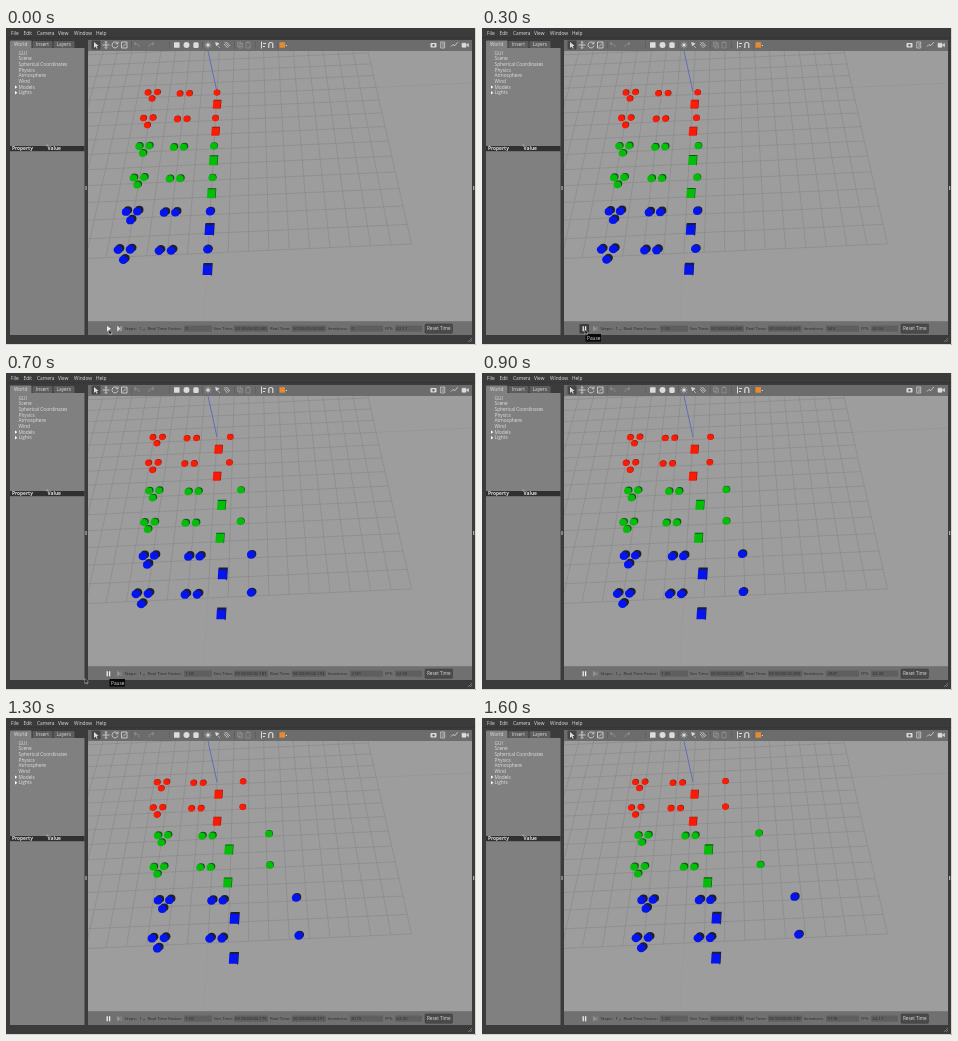
An HTML page for the animation above (1.7 s loop, 470x317 px).

```html
<!DOCTYPE html>
<html lang="en">
<head>
<meta charset="utf-8">
<title>Rolling shapes simulation</title>
<style>
html, body { margin: 0; width: 100%; height: 100%; overflow: hidden; background: #3b3b3b; }
svg { display: block; width: 470px; height: 317px; }
text { font-family: "Open Sans", "Noto Sans", sans-serif; font-size: 4.8px; fill: #dedede; }
.status { font-size: 4.3px; fill: #2a2a2a; }
</style>
</head>
<body>
<svg id="stage" viewBox="0 0 470 317" xmlns="http://www.w3.org/2000/svg">
  <defs><clipPath id="view"><rect x="82" y="23" width="384" height="270.5"/></clipPath></defs>
  <rect width="470" height="317" fill="#3b3b3b"/>
  <g id="frame"></g>
  <g id="scene" clip-path="url(#view)"></g>
  <g id="tools"></g>
  <g id="status"></g>
  <g id="overlay"></g>
</svg>
<script>
const $ = id => document.getElementById(id);
const frame = $("frame"), scene = $("scene"), tools = $("tools"), bar = $("status"), overlay = $("overlay");

function add(parent, tag, attrs, content) {
  const el = document.createElementNS("http://www.w3.org/2000/svg", tag);
  for (const key in attrs) el.setAttribute(key, attrs[key]);
  if (content !== undefined) el.textContent = content;
  parent.appendChild(el);
  return el;
}
const rect = (p, x, y, width, height, fill, more) => add(p, "rect", { x, y, width, height, fill, ...more });
const disc = (p, cx, cy, rx, ry, fill) => add(p, "ellipse", { cx, cy, rx, ry, fill });
const path = (p, d, stroke, width = 0.8, fill = "none") =>
  add(p, "path", { d, stroke, "stroke-width": width, fill });
const label = (p, x, y, str, more) => add(p, "text", { x, y, ...more }, str);

// Window and side panel
function drawFrame() {
  [["File", 5], ["Edit", 17.5], ["Camera", 31], ["View", 52], ["Window", 68], ["Help", 90]]
    .forEach(([s, x]) => label(frame, x, 6.6, s));
  rect(frame, 0, 9.5, 470, 0.6, "#303030");
  rect(frame, 4, 20, 74.5, 287, "#808080");
  rect(frame, 4, 12.5, 21.5, 8, "#808080", { rx: 1 });
  rect(frame, 26.5, 13, 20, 7, "#5c5c5c", { rx: 1 });
  rect(frame, 47.5, 13, 21, 7, "#5c5c5c", { rx: 1 });
  [["World", 8], ["Insert", 30], ["Layers", 50.5]].forEach(([s, x]) => label(frame, x, 18.2, s));
  ["GUI", "Scene", "Spherical Coordinates", "Physics", "Atmosphere", "Wind", "Models", "Lights"]
    .forEach((s, i) => {
      const y = 26.7 + i * 5.68;
      label(frame, 12.5, y, s);
      if (i > 5) path(frame, `M9 ${y - 3.4}l2.3 1.7l-2.3 1.7z`, "none", 0, "#fff");
    });
  rect(frame, 4, 118, 74.5, 5.2, "#303030");
  label(frame, 6, 122.3, "Property", { "font-weight": 700 });
  label(frame, 41.5, 122.3, "Value", { "font-weight": 700 });
  path(frame, "M39.8 118l1.4 -1.2l1.4 1.2", "#ddd", 0.5);
  rect(frame, 79.4, 158, 1.3, 4, "#aaa");
  rect(frame, 467, 158, 1.3, 4, "#aaa");
  path(frame, "M462 314l4 -4M464 314l2 -2", "#999", 0.6);
  path(frame, "M469.5 0V316.5H0", "#d4d4d4", 1);
  rect(frame, 82, 12, 384, 11, "#6c6c6c");
  rect(frame, 82, 293.5, 384, 13.5, "#707070");
}

// Ground point: u runs right, v runs towards the viewer
function ground(u, v) {
  const s = 1000 / (1.7645 - 0.0385 * v);
  const x = 243.5 + s * (u * 0.0281 - 0.0575);
  return `${x.toFixed(1)} ${(s - 500 - 0.045 * (x - 206)).toFixed(1)}`;
}

function drawGround() {
  rect(scene, 82, 23, 384, 271, "#9d9d9d");
  let d = "";
  for (let i = -10; i <= 10; i++)
    d += `M${ground(i, -10)}L${ground(i, 10)}M${ground(-10, i)}L${ground(10, i)}`;
  path(scene, d, "#848484", 0.55);
  path(scene, `M${ground(10, 0)}L${ground(20, 0)}`, "#8d938d", 0.5);
  path(scene, `M${ground(0, 10)}L${ground(0, 14)}`, "#a98f8f", 0.5);
  path(scene, "M202 23L211 64", "#5162c4", 0.8);
}

const RED = { main: "#fb1a04", dark: "#8a1208", off: 0.6, size: 7.6, from: 0.8 };
const GREEN = { main: "#04bd08", dark: "#0a5a10", off: 1.1, size: 8.2, from: 1.2 };
const BLUE = { main: "#0414ee", dark: "#1c1e30", off: 2, size: 9, from: 1.5 };

// paint, y, radius, gap, third ball [x, y], then [start, travel] of trio, pair, single and box, box y
const rows = [
  [RED, 64.5, 3.2, 9.5, [4, 6], [142, 11.5], [174, 17], [211, 32.5], [210.5, 1.5], 76],
  [RED, 90, 3.3, 9.5, [4, 7], [137.5, 12], [171.5, 17.5], [209.5, 34], [209, 1.5], 103],
  [GREEN, 118, 3.7, 10, [3.6, 7], [133.5, 23], [168, 35.5], [208, 69], [207, 19], 132],
  [GREEN, 149.5, 3.8, 10.4, [3.7, 7], [128, 24.5], [164, 38], [206.5, 72], [205, 20], 165],
  [BLUE, 183, 4.2, 11.3, [4.3, 8.5], [121, 39.5], [159, 59], [204.5, 108.5], [203, 31], 201],
  [BLUE, 221, 4.4, 12.1, [5.3, 10], [113, 42], [154, 63], [202, 115], [201, 32.5], 241]
];
const movers = [];

function mover(span, y, from, until = 16) {
  const g = add(scene, "g", {});
  movers.push({ g, span, y, from, until });
  return g;
}

// The lit face and the dark far side share one centre
function ball(g, x, y, r, paint, off = paint.off) {
  const dx = off * 0.5, dy = off * 0.45;
  disc(g, x + dx, y - dy, r, r * 0.92, paint.dark);
  disc(g, x - dx, y + dy, r, r * 0.94, paint.main);
}

function cube(g, { size, off, main, dark }) {
  const h = size / 2, lean = 0.6;
  path(g, `M${lean - h} ${-h}l${lean} ${-off}h${size}l${-lean} ${size + off}l${-lean} ${off}z`, "none", 0, dark);
  path(g, `M${lean - h} ${-h}h${size}l${-lean} ${size + 0.8}h${-size}z`, "none", 0, main);
}

function drawRow([paint, y, r, gap, third, trio, pair, single, box, boxY]) {
  let g = mover(trio, y, 0.3);
  ball(g, 0, 0, r, paint);
  ball(g, gap, -0.4, r, paint);
  ball(g, third[0], third[1], r, paint);
  g = mover(pair, y + 0.9, 0.7);
  ball(g, 0, 0, r, paint);
  ball(g, gap, -0.2, r, paint);
  ball(mover(single, y, paint.from), 0, 0, r, paint, paint.off * 0.5);
  cube(mover(box, boxY + paint.off * 0.3, 0.35, paint === RED ? 3 : 16), paint);
}

// Toolbar icons
function drawTools() {
  const ink = "#dcdcdc", dim = "#959595";
  rect(tools, 85.5, 12.6, 9, 9, "#464646", { rx: 1 });
  path(tools, "M88 14v6l1.6 -1.5l1.1 2.2l1 -.5l-1.1 -2.1h2z", "none", 0, ink);
  path(tools, "M96.5 17h7M100 13.5v7M98.8 14.7l1.2 -1.2l1.2 1.2M98.8 19.3l1.2 1.2l1.2 -1.2", ink);
  path(tools, "M111.5 15.2a3 3 0 1 0 .5 2.4M112 13.5v2.3h-2.3", ink);
  path(tools, "M115.5 14h5.5v6h-5.5zM117 18.5l3 -3", ink);
  path(tools, "M133 19q0 -3.5 -4.5 -3.3M130 14l-2 1.7l2 1.7M143 19q0 -3.5 4.5 -3.3M146 14l2 1.7l-2 1.7", dim);
  [125, 163.5, 196.5, 228, 249, 271].forEach(x => rect(tools, x, 13.5, 0.4, 7, "#505050"));
  rect(tools, 168, 14.2, 5.6, 5.6, ink, { rx: 0.6 });
  disc(tools, 180.5, 17, 3, 3, ink);
  rect(tools, 187.3, 14.2, 5.4, 5.8, ink, { rx: 1.5 });
  disc(tools, 202, 17, 1.5, 1.5, ink);
  path(tools, "M202 13.5v7M198.5 17h7M199.5 14.5l5 5M204.5 14.5l-5 5", ink, 0.5);
  path(tools, "M209.5 14.5l3.5 1l-2.5 2.5zM212 18l2 2", ink, 0.6, ink);
  path(tools, "M218.5 14l4.5 5M220.5 14l3.5 4M218 16l3.5 4", ink, 0.7);
  path(tools, "M231.5 14h3.5v4.5h-3.5zM233 15.5h3.5v4.5h-3.5zM240 14.5h4v5.5h-4zM241 14h2", dim, 0.7);
  path(tools, "M255.5 13.5v7M257 15.5h3M257 18.5h2", ink, 1);
  path(tools, "M262.8 20v-3.5a2 2 0 0 1 4 0v3.5", ink, 1.2);
  rect(tools, 273.5, 14.2, 5.5, 5.5, "#e78a2c");
  rect(tools, 279.8, 17, 1.2, 1, ink);
  rect(tools, 424.5, 15, 6, 4.5, ink, { rx: 0.7 });
  disc(tools, 427.5, 17.2, 1.2, 1.2, "#6c6c6c");
  path(tools, "M434.7 14h4v6h-4zM436 16h2M436 18h2", ink, 0.7);
  path(tools, "M445 18.5l2 -2l1.8 1.2l3 -3.5", ink, 0.8);
  path(tools, "M456 15.2h4v4h-4zM460.5 17l2 -1.5v3.2z", ink, 0.6, ink);
}

const field = (x, w) => rect(bar, x, 297.5, w, 6.2, "#5f5f5f", { rx: 0.7 });
const value = x => label(bar, x, 302.2, "", { class: "status" });
let play, pause, step, hover, tip, cursor, vals;

function drawStatus() {
  hover = rect(bar, 97.5, 296, 9.5, 9.5, "#3c3c3c", { rx: 1 });
  play = path(bar, "M101 298l4 2.7l-4 2.7z", "none", 0, "#eee");
  pause = path(bar, "M101.2 298.2v5M103.6 298.2v5", "#eee", 1.3);
  step = path(bar, "M111.5 298.3l2.6 2.4l-2.6 2.4zM115 298.3v4.8", "#ddd", 0.7, "#ddd");
  [["Steps:", 118.5], ["1", 133.5], ["Real Time Factor:", 141.5], ["Sim Time:", 207.5],
   ["Real Time:", 264], ["Iterations:", 321.5], ["FPS:", 379]]
    .forEach(([s, x]) => label(bar, x, 302.2, s, { class: "status" }));
  path(bar, "M137 301.2l1 1l1 -1", "#222", 0.5);
  [[178, 28], [228, 34], [286, 34], [344, 33], [389, 27]].forEach(([x, w]) => field(x, w));
  vals = [179.5, 229, 287, 345.5, 390.5].map(value);
  rect(bar, 419, 296, 27.5, 9.3, "#4a4a4a", { rx: 1, stroke: "#363636", "stroke-width": 0.5 });
  label(bar, 421, 302.3, "Reset Time", { style: "font-size:4.6px" });
  tip = add(overlay, "g", {});
  rect(tip, 103.5, 306, 15.5, 7.6, "#080808");
  label(tip, 105, 311.6, "Pause");
  cursor = path(overlay, "M0 0v5l1.2 -1.1l.8 1.7l.8 -.4l-.8 -1.6h1.6z", "#fff", 0.4, "#111");
}

const clock = ms => `00 00:00:0${(ms / 1000).toFixed(3)}`;
const show = (el, on) => el.setAttribute("visibility", on ? "visible" : "hidden");

function render(ms) {
  const k = Math.floor((ms % 1700) / 100);
  for (const { g, span, y, from, until } of movers) {
    const p = Math.min(1, Math.max(0, (k - from) / (until - from)));
    const dx = span[1] * p;
    g.setAttribute("transform", `translate(${span[0] + dx} ${y - dx * 0.042})`);
  }
  const running = k > 0;
  const steps = running ? Math.round(333 * (k - 0.45)) : 0;
  [running ? "1.00" : "0", clock(steps), clock(running ? steps + 12 : 0), steps,
   (62.17 + (k % 4) * 0.13).toFixed(2)].forEach((s, i) => { vals[i].textContent = s; });
  show(play, !running);
  show(pause, running);
  step.setAttribute("opacity", running ? 0.35 : 1);
  show(hover, running && k < 6);
  show(tip, k > 1 && k < 8);
  show(cursor, k < 8);
  const away = Math.max(0, k - 5) / 2;
  cursor.setAttribute("transform", `translate(${102.8 - 24 * away} ${301.5 + 4 * away})`);
}

drawFrame();
drawGround();
rows.forEach(drawRow);
drawTools();
drawStatus();

const start = performance.now();
function tick() {
  render(performance.now() - start);
  requestAnimationFrame(tick);
}
tick();
</script>
</body>
</html>
```
